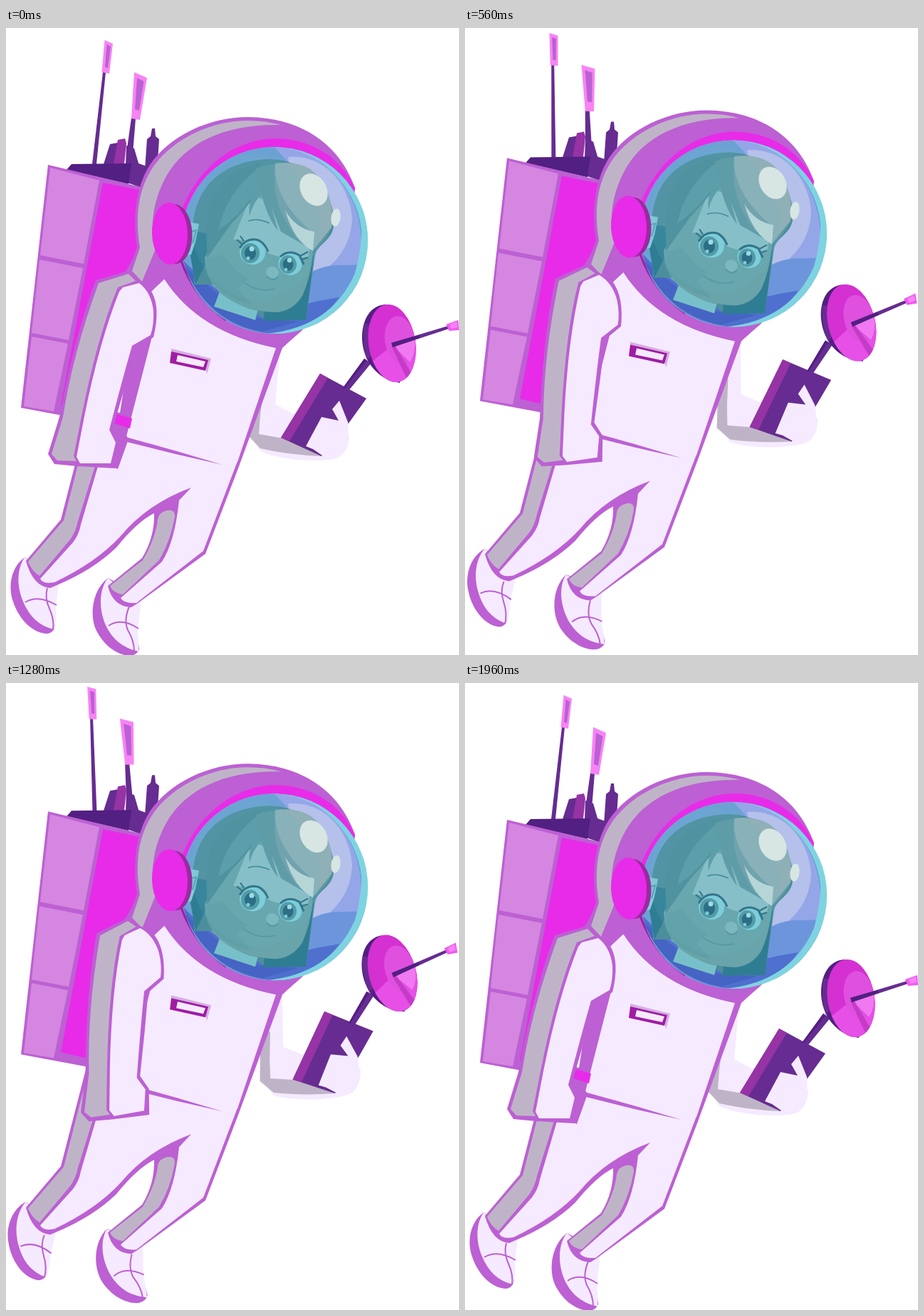
Animation, 636 px wide and 880 px high, one loop 2000 ms. Source, as an HTML page with a canvas:

```html
<!DOCTYPE html>
<html lang="en">
<head>
<meta charset="utf-8">
<title>Floating astronaut</title>
<style>
html, body { margin: 0; width: 100%; height: 100%; overflow: hidden; background: #fff; }
canvas { display: block; width: 636px; height: 880px; }
</style>
</head>
<body>
<canvas id="stage" width="636" height="880"></canvas>
<script>
const ctx = document.getElementById('stage').getContext('2d');
const SUIT = '#f5eaff', LINE = '#bc60d3', LILAC = '#d586e0', HOT = '#e82be8';
const DARK = '#662c91', DEEP = '#521f82', GRAY = '#bfb4c7', PLUM = '#9633a5', PINK = '#f783f5';
const cache = new Map();

function path(d) {
  if (!cache.has(d)) cache.set(d, new Path2D(d));
  return cache.get(d);
}
function fill(color, d) {
  ctx.fillStyle = color;
  ctx.fill(path(d));
}
function line(color, width, d) {
  ctx.strokeStyle = color;
  ctx.lineWidth = width;
  ctx.stroke(path(d));
}
function oval(color, x, y, rx, ry = rx, tilt = 0) {
  ctx.fillStyle = color;
  ctx.beginPath();
  ctx.ellipse(x, y, rx, ry, tilt * Math.PI / 180, 0, 7);
  ctx.fill();
}
function turn(x, y, deg, draw) {
  ctx.save();
  ctx.translate(x, y);
  ctx.rotate(deg * Math.PI / 180);
  ctx.translate(-x, -y);
  draw();
  ctx.restore();
}

function dishArm() {
  fill(SUIT, 'M350 440L385 450L378 528L402 541L450 535L482 572Q481 592 468 602Q455 609 410 606Q375 602 357 594L342 570Z');
  fill(GRAY, 'M350 490L362 506L357 543L355 570L396 577L443 601Q395 599 357 590L340 572Z');
  fill(DARK, 'M441 485L506 520L483 552L443 601L386 575Z');
  fill(PLUM, 'M441 485L452 491L398 580L386 575Z');
  fill(SUIT, 'M421 587L443 546L467 551L458 535L468 523L480 553Q483 585 468 602L440 607L444 600L431 591Z');
  fill(DARK, 'M473 505L503 464L513 470L481 509Z');
  fill(DEEP, 'M473 505L503 464L506 467L475 506Z');
  // dish
  fill(DEEP, 'M533 388C512 389 499 409 500 437C501 465 520 494 553 498L560 440Z');
  fill(DARK, 'M503 414L514 417L516 455L507 466Q499 445 503 414Z');
  oval('#d430d2', 542, 442.5, 33, 55, -9);
  ctx.save();
  ctx.beginPath();
  ctx.ellipse(542, 442.5, 33, 55, -9 * Math.PI / 180, 0, 7);
  ctx.clip();
  fill('#e650e6', 'M514 468L543 445L580 432L580 505L514 505Z');
  oval('#df50df', 553, 438, 21, 34, -9);
  fill('#f078f0', 'M543 445L574 435Q576 456 567 469Z');
  fill('#c43bc8', 'M541 446L547 447L570 486L562 491Z');
  ctx.restore();
  fill(DARK, 'M541 442L621 418L622 422L543 448Z');
  fill(DEEP, 'M541 442L580 431L581 435L543 448Z');
  fill('#f05af0', 'M618 416L635 410L636 424L622 425Z');
  fill(PINK, 'M623 416L633 412L634 420L625 422Z');
}

function pack(p) {
  turn(126, 188, -11.7 * p, () => {
    fill(DARK, 'M136 62L140 62L127 191L121 191Z');
    fill(PINK, 'M138.5 17L150 22L145 64L134.5 62Z');
    fill(LINE, 'M141.5 23L147 26L143 56L139 55Z');
  });
  fill(DARK, 'M137 191L146 163L157 161L153 191ZM168 191L169 165L180 169L187 193Z');
  turn(168, 176, -14.5 * p, () => {
    fill(DARK, 'M176 126L182 127L178 176L169 176Z');
    fill(PINK, 'M180 62L198 70L188 129L176 127Z');
    fill(LINE, 'M184 70L193.5 75L187 116L181 114Z');
  });
  fill(PLUM, 'M151 191L157 157L167 155L169 162L166 191Z');
  fill(DARK, 'M195 198L198 156L203 152L205 141L209 141L210 152L215 156L212 202Z');
  fill(DARK, 'M174 190L186 190L236 208L190 224L170 217Z');
  fill(DEEP, 'M85 199L92 191L176 190L172 219Z');
  fill(LINE, 'M59 192L210 228L200 350L140 390L112 550L21 533Z');
  fill(LILAC, 'M62 196L131 214L109 331L48 319ZM47 325L108 337L88 438L36 428ZM36 433L87 443L67 538L25 531Z');
  fill(HOT, 'M136 217L195 229L186 310L166 345L128 400L112 538L77 530Z');
}

function leftShoe() {
  fill(LINE, 'M26 743C6 758 3 785 10 805C18 830 38 850 58 850Q67 849 69 838L60 765Z');
  fill(SUIT, 'M26 743C15 760 15 783 24 805C33 826 46 839 67 844Q72 830 70 813L74 778L50 762Z');
  line(LINE, 2, 'M27 806Q45 795 71 810M58 786Q54 800 61 815Q68 830 66 845');
}
function rightShoe() {
  fill(LINE, 'M143 772C120 790 117 826 127 846C138 868 158 881 174 881Q184 880 187 872L178 790Z');
  fill(SUIT, 'M143 772C131 788 130 812 139 836C148 856 161 869 186 875Q187 860 185 844L190 803L166 790Z');
  line(LINE, 2, 'M144 839Q162 827 186 843M173 812Q165 831 171 845Q180 860 180 875');
}

function body(p) {
  turn(52, 755, 11 * p, leftShoe);
  turn(185, 785, -11 * p, rightShoe);
  fill(LINE, 'M118 531L77 690L28 748Q38 784 62 786L69 783Q122 761 155 729Q184 693 208 681Q209 714 191 744L143 783Q150 812 176 813L184 808L280 738L326 618L388 449L414 425L250 330L190 350L160 540Z');
  fill(GRAY, 'M122 531L81 691L31 749Q36 762 47 769L90 718Q98 707 101 692L125 615L150 540Z');
  fill(GRAY, 'M213 690Q214 680 226 677Q238 675 237 686Q231 720 215 747L164 795Q150 793 146 783L192 747Q210 716 213 690Z');
  fill(SUIT, 'M166 579L240 590L325 608L277 734L183 807Q165 808 161 800L219 749Q237 721 243 663L260 645Q198 668 161 713Q127 750 68 778Q52 781 48 773L94 722Q103 710 105 697L130 612L145 575Z');
  fill(SUIT, 'M223 352Q270 427 379 449L325 609L168 577L204 437L211 400L203 370Z');
  fill(LINE, 'M168 574L240 594L304 613L238 598L166 580Z');
  fill(LINE, 'M150 540L172 577L157 619L140 612Z');
  fill(HOT, 'M152 541L177 548L174 562L150 554Z');
  fill('#d6aee2', 'M232 450L288 464L282 486L279 470L232 457Z');
  fill('#a01ca5', 'M232 454L284 466L280 481L230 470Z');
  fill(SUIT, 'M241 459L280 468L277 476L239 468Z');
}

function eye(x, y, s) {
  oval('#80d2dd', x, y, 18 * s, 17 * s, 10);
  oval('#4f96a0', x - 3, y + 1, 13 * s, 14 * s);
  oval('#206179', x - 3, y + 1, 8 * s, 9.5 * s);
  oval('#a5e5eb', x - 1, y - 5, 3.5 * s);
  oval('#80d2dd', x - 6, y + 8, 2.5 * s);
}

function face() {
  // hair behind the head
  fill('#4d8e9c', 'M264 360L262 300C258 235 292 187 369 184C430 186 462 229 460 278C458 298 438 303 434 318L421 410L362 409L300 360Z');
  fill('#2f7d92', 'M263 285L292 290L282 328L266 360L259 320ZM411 375L424 325L432 320L421 410L361 411L364 392Z');
  fill('#78c0c9', 'M300 370L356 386L350 410L292 391Z');
  fill('#5d9ea8', 'M306 372L357 386L354 397Q325 392 306 372Z');
  // head
  fill('#68a4a9', 'M279 322L300 283L342 227L390 240L431 304Q431 342 416 376Q402 398 378 399Q332 397 302 373Q280 353 279 322Z');
  fill('#8dc1c8', 'M319 297L344 235L385 248L428 302L424 322Q383 325 365 314Q343 296 319 297Z');
  fill('#619fa6', 'M281 324L304 318L323 340L340 352L325 365L345 388Q301 379 283 347Z');
  // fringe
  fill('#4b8b99', 'M282 303C278 250 294 200 358 190L358 226Q330 261 316 275L282 323Z');
  fill('#599aa4', 'M298 284Q308 233 354 197L362 229Q346 246 342 264Q340 251 345 238Q326 265 298 284Z');
  fill('#5c98a2', 'M351 197C404 175 454 216 461 266Q455 296 431 312Q397 292 386 286L373 253L382 285Q361 260 351 197Z');
  fill('#8eb0b6', 'M378 190Q429 183 448 223Q461 248 457 280L431 312L405 291Q374 238 378 190Z');
  fill('#729fa9', 'M378 205Q384 248 428 285L430 302L405 291Q373 246 378 205Z');
  fill('#c4dbda', 'M392 256Q406 281 433 286L431 313Q404 299 392 256Z');
  line('#438692', 1.7, 'M340 271Q353 266 370 274');
  eye(346, 315, 1);
  eye(399, 331, .92);
  line('#28697f', 3, 'M328 309Q338 293 355 298Q364 303 368 314M385 321Q397 310 412 319L418 332');
  line('#28697f', 2, 'M331 303L324 297M334 299L329 292M413 320L424 314M415 325L424 322');
  oval('#7eb9bf', 374, 343, 9, 8, 20);
  line('#528f99', 1.5, 'M366 348Q374 358 382 349M334 357Q354 372 378 366');
}

function visor() {
  oval('#7ed3e1', 377, 298, 131);
  ctx.save();
  ctx.beginPath();
  ctx.arc(377, 298, 131, 0, 7);
  ctx.clip();
  oval('#6ca2d3', 369, 298, 131);
  fill('#94a6e8', 'M377 167C453 170 503 235 499 315L490 342L420 358L425 220Z');
  fill('#b5c0eb', 'M396 181C448 177 483 220 486 269Q483 321 433 349L410 300Z');
  fill('#6d95dc', 'M404 360Q438 330 473 333L503 332Q492 389 438 416L350 422Z');
  fill('#4f70ce', 'M246 323Q285 365 321 380Q390 397 439 383L468 378Q434 427 373 429Q280 420 246 323Z');
  fill('#4564c4', 'M250 335L300 375L292 390L350 407L410 412L360 426Q284 412 250 335Z');
  face();
  fill('#83cbd9', 'M250 271L271 275L266 300L260 318L250 320Z');
  line('#569eb4', 2, 'M259 286L267 284L262 302');
  ctx.globalAlpha = .16;
  oval('#6db2c4', 350, 279, 90, 103, -12);
  ctx.globalAlpha = 1;
  fill('#7ed3e1', 'M499 240L512 240L512 400L400 432L366 429Q457 420 490 344Q503 300 499 240Z');
  oval('#d7e6e3', 432, 227, 18, 24, -30);
  oval('#d7e6e3', 463, 266, 6.5, 12.5, 8);
  ctx.restore();
}

function helmet() {
  fill(LINE, 'M171 344L184 307C178 267 181 226 202 192C229 152 284 125 340 125C413 126 467 161 490 224L480 360L414 426L387 449L379 449Q270 427 222 352L203 371L190 360Z');
  fill(GRAY, 'M177 341L188 308C181 264 185 226 208 193C237 154 289 130 340 130Q365 130 386 136C309 134 252 160 225 208Q203 248 206 291L210 310L191 356Z');
  fill(HOT, 'M243 266C261 206 314 155 380 155C430 156 472 183 490 226L470 260L260 280Z');
  line('#a11ca2', 3, 'M246 327Q264 378 309 410');
  visor();
  oval('#9a2aa0', 237, 289, 24.5, 42, -2);
  oval(HOT, 230, 288.5, 25, 43.5, -2);
}

function nearArm() {
  fill(LINE, 'M175 340L126 354Q105 407 84 501L75 546L59 598L68 612L100 615L153 618L159 582L150 562L168 500L182 449L207 434Q217 394 205 371L188 355Z');
  fill(GRAY, 'M130 358L172 345L182 355L157 364Q129 430 106 545L95 601L99 608L72 607L64 598L80 546Q94 456 130 358Z');
  fill(SUIT, 'M164 364L187 358Q204 371 207 397Q208 416 203 431L177 446Q165 487 145 564L154 582L147 611L104 611L99 602L110 545Q131 440 159 370Z');
}

function draw(now) {
  const step = Math.floor(now % 2000 / 40);
  const p = 1 - Math.abs(step - 24.5) / 24.5;
  ctx.fillStyle = '#fff';
  ctx.fillRect(0, 0, 636, 880);
  ctx.save();
  ctx.translate(0, -16.8 * p);
  turn(334, 425, -9.3 * p, dishArm);
  pack(p);
  body(p);
  helmet();
  turn(175, 350, -14.8 * p, nearArm);
  ctx.restore();
}

const start = performance.now();
function tick() {
  draw(performance.now() - start);
  requestAnimationFrame(tick);
}
tick();
</script>
</body>
</html>
```
